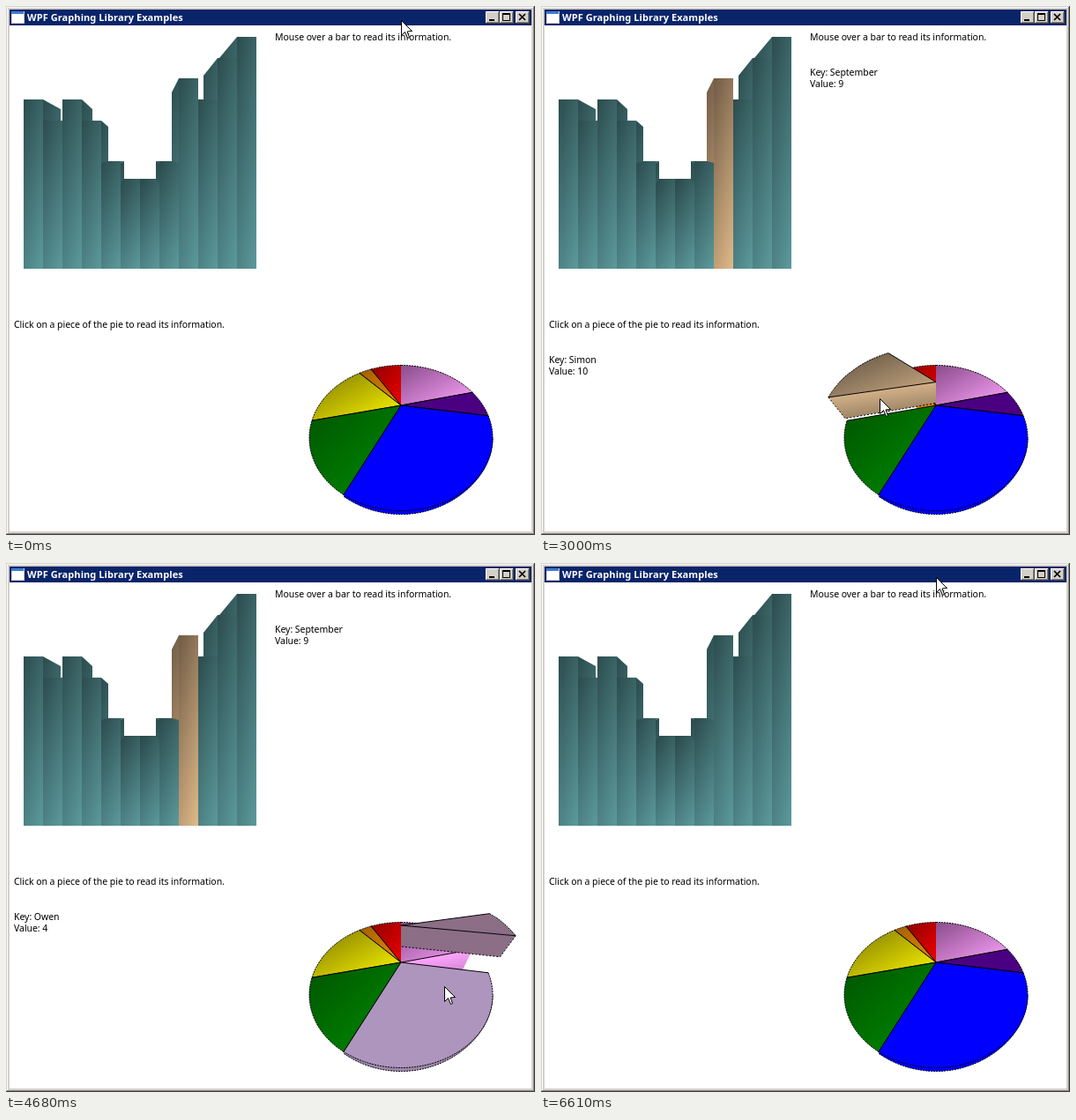
An HTML page with a canvas that plays this animation: 600x600 px, repeating every 6760 ms.

```html
<!DOCTYPE html>
<html lang="en">
<head>
<meta charset="utf-8">
<title>WPF Graphing Library Examples</title>
<style>
  html, body { margin: 0; width: 100%; height: 100%; overflow: hidden; background: #fff; }
  canvas { display: block; }
</style>
</head>
<body>
<canvas id="stage" width="600" height="600"></canvas>
<script>
const LOOP = 6760, STEP = 120, LAST = 5040, FADE_AT = 5250, FADE_STEP = 90, FADE_STEPS = 16;
const BAR_FADE = 500, SLICE_FADE = 600, LIFT_TIME = 1000;
const TEXT = '10.5px "Noto Sans", sans-serif';
const TITLE = 'bold 11px "Noto Sans", sans-serif';

let ctx;
const clamp = v => Math.max(0, Math.min(1, v));
const pulse = (t, on, off, d) => clamp((t - on) / d) - clamp((t - off) / d);

// Colours blend in linear light.
const mix = (a, b, k) => a.map((v, i) => {
  const lin = (1 - k) * (v / 255) ** 2.2 + k * (b[i] / 255) ** 2.2;
  return Math.round(255 * lin ** (1 / 2.2));
});
const rgb = c => `rgb(${c.join(',')})`;

function rect(x, y, w, h, fill) {
  ctx.fillStyle = fill;
  ctx.fillRect(x, y, w, h);
}

function trace(pts, close) {
  ctx.beginPath();
  pts.forEach(([x, y]) => ctx.lineTo(x, y));
  if (close) ctx.closePath();
}

function fillPoly(pts, fill) {
  trace(pts, true);
  ctx.fillStyle = fill;
  ctx.fill();
}

function line(pts, dash = []) {
  trace(pts);
  ctx.setLineDash(dash);
  ctx.strokeStyle = '#000';
  ctx.lineWidth = 1;
  ctx.stroke();
  ctx.setLineDash([]);
}

function text(str, x, y, font = TEXT, fill = '#000', gap = '-0.05px') {
  ctx.font = font;
  ctx.letterSpacing = gap;
  ctx.fillStyle = fill;
  ctx.fillText(str, x, y);
}

// Diagonal gradient over a box; u is the share that runs across the width.
function diagonal(x, y, w, h, u, [c0, c1]) {
  const gx = u / w, gy = (1 - u) / h, n = gx * gx + gy * gy;
  const g = ctx.createLinearGradient(x, y, x + gx / n, y + gy / n);
  g.addColorStop(0, rgb(c0));
  g.addColorStop(1, rgb(c1));
  return g;
}

/* ---- window ---- */

function button(x, glyph) {
  rect(x, 6, 16, 14, '#404040');
  rect(x, 6, 15, 13, '#fff');
  rect(x + 1, 7, 14, 12, '#808080');
  rect(x + 1, 7, 13, 11, '#d4d0c8');
  glyph(x);
}

function drawWindow() {
  rect(0, 0, 600, 600, '#404040');
  rect(0, 0, 599, 599, '#d4d0c8');
  rect(1, 1, 598, 598, '#808080');
  rect(1, 1, 597, 597, '#fff');
  rect(2, 2, 596, 596, '#d4d0c8');
  rect(4, 4, 592, 18, '#0a246a');
  rect(4, 22, 592, 574, '#fff');
  rect(6, 6, 15, 14, '#d4d0c8');
  rect(6, 6, 14, 3, '#3a7bd5');
  rect(7, 9, 13, 10, '#fff');
  text('WPF Graphing Library Examples', 24, 17, TITLE, '#fff', '0.07px');
  button(544, x => rect(x + 4, 15, 6, 2, '#000'));
  button(560, x => {
    rect(x + 3, 8, 9, 9, '#000');
    rect(x + 4, 10, 7, 6, '#d4d0c8');
  });
  button(578, x => {
    ctx.strokeStyle = '#000';
    ctx.lineWidth = 1.7;
    ctx.beginPath();
    ctx.moveTo(x + 4, 9); ctx.lineTo(x + 11, 16);
    ctx.moveTo(x + 11, 9); ctx.lineTo(x + 4, 16);
    ctx.stroke();
  });
}

/* ---- bars ---- */

const VALUES = [8, 7, 8, 7, 5, 4, 4, 5, 9, 8, 10, 11];
const TEAL = [[44, 76, 78], [92, 154, 156]];
const TAN_BAR = [[112, 91, 70], [224, 186, 137]];
const HOVERS = [
  { bar: 11, name: 'December', on: 480, off: 780 },
  { bar: 10, name: 'November', on: 780, off: 900 },
  { bar: 9, name: 'October', on: 900, off: 1020 },
  { bar: 8, name: 'September', on: 1020, off: Infinity }
];

const recede = ([x, y]) => [Math.round(x + (152 - x) * 0.182), Math.ceil(y + (165 - y) * 0.182)];

function drawBar(i, t) {
  const h = HOVERS.find(v => v.bar === i);
  const k = h ? pulse(t, h.on, h.off, BAR_FADE) : 0;
  const colors = TEAL.map((c, j) => mix(c, TAN_BAR[j], k));
  const x = 20 + 22 * i, y = Math.floor(298 - 23.9 * VALUES[i]);
  const edge = i < 6 ? x + 22 : x;
  const a = [x, y], b = [x + 22, y], near = [edge, y];
  const fill = diagonal(x, y, 22, 298 - y, 0.3, colors);
  const back = recede(near);
  fillPoly([near, back, [back[0], 270], [edge, 298]], diagonal(Math.min(edge, back[0]), y, 22, 298 - y, 0.3, colors));
  if (y > 165) fillPoly([a, b, recede(b), recede(a)], fill);
  rect(x, y, 22, 298 - y, fill);
}

function drawBars(t) {
  for (let i = 0; i < 6; i++) {
    drawBar(i, t);
    drawBar(11 - i, t);
  }
}

/* ---- pie ---- */

const CX = 448, CY = 490, RX = 104, RY = 82.5, TIP = [448, 453], DEPTH = 0.57;
const TAN = [210, 180, 140];
const RED = { from: 250.9, to: 270, colors: [[140, 0, 0], [240, 0, 0]] };
const VIOLET = { from: -90, to: -38.8, wall: 'to', colors: [[138, 76, 138], [255, 165, 255]] };
const ORANGE = { from: 243.1, to: 250.9, wall: 'from', colors: [[160, 95, 0], [235, 140, 0]] };
const INDIGO = { from: -38.8, to: -17.8, wall: 'to', colors: [[75, 0, 130], [75, 0, 130]],
  hot: [TAN, TAN], on: 3110, off: 4284, out: 3600, back: Infinity };
const YELLOW = { from: 193.8, to: 243.1, wall: 'from', colors: [[125, 120, 0], [255, 248, 0]],
  hot: [[90, 77, 60], [210, 176, 136]], on: 2250, off: 3100, out: 2370, back: 3600 };
const GREEN = { from: 128.7, to: 193.8, colors: [[0, 84, 0], [0, 140, 0]] };
const BLUE = { from: -17.8, to: 128.7, colors: [[0, 0, 255], [0, 0, 255]],
  hot: [TAN, TAN], on: 4284, off: Infinity };
const SLICES = [RED, VIOLET, ORANGE, INDIGO, YELLOW, GREEN, BLUE];

function rim(deg) {
  const a = deg * Math.PI / 180;
  return [CX + RX * Math.cos(a), CY + RY * Math.sin(a)];
}

// Lower edge of the disc, which shows only at the front.
function lowRim(deg) {
  const [x, y] = rim(deg);
  return [x, y + 4 * Math.sin(deg * Math.PI / 180) ** 3];
}

// Raising a point brings it nearer, so it also spreads from the middle.
function lift([x, y], z) {
  const spread = 0.24 + Math.max(0, y - 440) * 0.003;
  const rise = 42 - Math.max(0, 445 - y) * 0.2;
  return [x + (x - CX) * spread * z, y - rise * z];
}

function arc(from, to, place) {
  const n = Math.ceil(Math.abs(to - from) / 2);
  return Array.from({ length: n + 1 }, (_, i) => place(from + (to - from) * i / n));
}

// The side wall is brightest along its top edge.
function drawWall(s, tip, z, colors) {
  const side = rim(s[s.wall]);
  const end = lift(side, z), low = lift(side, z - DEPTH), lowTip = lift(TIP, z - DEPTH);
  const dx = end[0] - tip[0], dy = end[1] - tip[1], k = 24 / (dx * dx + dy * dy) ** 0.5;
  const turn = dx < 0 ? -k : k;
  const g = ctx.createLinearGradient(tip[0], tip[1], tip[0] - dy * turn, tip[1] + dx * turn);
  g.addColorStop(0, rgb(colors[1]));
  g.addColorStop(1, rgb(mix(colors[0], colors[1], 0.5)));
  fillPoly([tip, end, low, lowTip], g);
  if (z > 0) line([end, low, lowTip], [2, 2]);
}

function drawSlice(s, t) {
  const heat = s.hot ? pulse(t, s.on, s.off, SLICE_FADE) : 0;
  const z = s.out ? pulse(t, s.out, s.back, LIFT_TIME) : 0;
  const colors = s.hot ? s.colors.map((c, i) => mix(c, s.hot[i], heat)) : s.colors;
  const tip = lift(TIP, z);
  const edge = arc(s.from, s.to, d => lift(rim(d), z));

  if (s.wall) drawWall(s, tip, z, colors);
  if (s === BLUE) {
    const base = arc(0, s.to, lowRim);
    fillPoly([...base, TIP], rgb(mix(colors[0], [0, 0, 0], heat * 0.3)));
    line(base, [2, 1]);
  }

  const all = [tip, ...edge], xs = all.map(p => p[0]), ys = all.map(p => p[1]);
  const x = Math.min(...xs), y = Math.min(...ys);
  fillPoly(all, diagonal(x, y, Math.max(...xs) - x, Math.max(...ys) - y, 0.5, colors));
  line(edge, [2, 1]);
  if (s !== VIOLET) line([edge[0], tip]);
  if (s !== RED) line([edge[edge.length - 1], tip]);
}

/* ---- labels and pointer ---- */

const PICKS = [
  { at: 2370, name: 'Simon', value: 10 },
  { at: 3610, name: 'Owen', value: 4 }
];

function info(x, y, name, value) {
  text('Key: ' + name, x, y);
  text('Value: ' + value, x, y + 13);
}

function drawLabels(t) {
  text('Mouse over a bar to read its information.', 305, 39);
  text('Click on a piece of the pie to read its information.', 9, 365);
  const bar = HOVERS.filter(h => t >= h.on).pop();
  if (bar) info(305, 79, bar.name, VALUES[bar.bar]);
  const pick = PICKS.filter(p => t >= p.at).pop();
  if (pick) info(9, 405, pick.name, pick.value);
}

const PATH = [
  [0, 448, 16], [480, 282, 150], [720, 266, 190], [1080, 212, 262], [1320, 202, 293],
  [1680, 202, 293], [2160, 395, 457], [2400, 384, 445], [3000, 384, 445], [3240, 498, 447],
  [4080, 498, 447], [4320, 497, 480], [4680, 497, 480], [5040, 560, 530]
];
const ARROW = [[0, 0], [0, 17], [4, 13], [7, 20], [9, 19], [6.5, 12.5], [12, 12]];

function drawPointer(t) {
  const i = Math.max(1, PATH.findIndex(p => p[0] >= t));
  const [t0, x0, y0] = PATH[i - 1], [t1, x1, y1] = PATH[i];
  const k = (t - t0) / (t1 - t0);
  const x = Math.round(x0 + (x1 - x0) * k) + 0.5, y = Math.round(y0 + (y1 - y0) * k) + 0.5;
  const pts = ARROW.map(p => [p[0] + x, p[1] + y]);
  fillPoly(pts, '#fff');
  line([...pts, pts[0]]);
}

function drawScene(target, t) {
  ctx = target;
  drawWindow();
  drawBars(t);
  SLICES.forEach(s => drawSlice(s, t));
  drawLabels(t);
  drawPointer(t);
}

/* ---- playback ---- */

const stage = document.getElementById('stage').getContext('2d');
const opening = document.createElement('canvas');
opening.width = opening.height = 600;
drawScene(opening.getContext('2d'), 0);

function play() {
  const t = performance.now() % LOOP;
  drawScene(stage, Math.min(LAST, Math.floor(t / STEP) * STEP));
  if (t >= FADE_AT) {
    const k = Math.floor((t - FADE_AT) / FADE_STEP) + 1;
    stage.globalAlpha = Math.min(1, k / FADE_STEPS);
    stage.drawImage(opening, 0, 0);
    stage.globalAlpha = 1;
  }
  requestAnimationFrame(play);
}
play();
</script>
</body>
</html>
```
